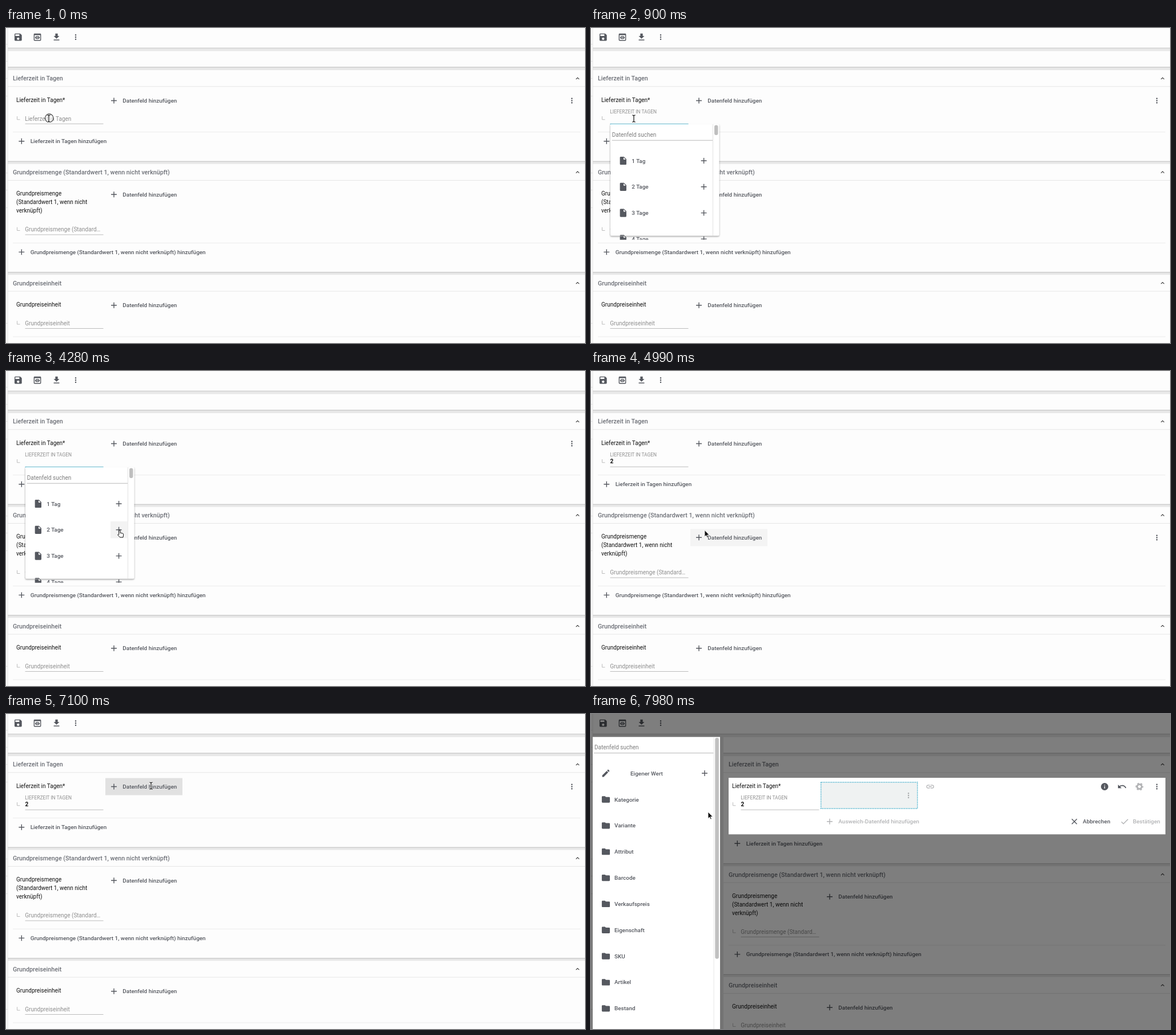
An HTML page for the animation above (8000 ms loop, 1014 by 553 pixels).

```html
<!DOCTYPE html>
<html lang="de">
<head>
<meta charset="utf-8">
<title>Datenfelder</title>
<style>
html, body { margin: 0; width: 100%; height: 100%; overflow: hidden; background: #fdfdfd; }
svg { display: block; width: 100%; height: 100%; }
text { font-family: Roboto, sans-serif; white-space: pre; }
</style>
</head>
<body>
<svg id="stage" viewBox="0 0 1014 553"></svg>
<script>
const LOOP = 8000;
const INK = '#55585f', HEAD = '#6d7077', SOFT = '#8e8e8e', OFF = '#b3b4b6', PAPER = '#fdfdfd';

const ICONS = {
  add: 'M19 13h-6v6h-2v-6H5v-2h6V5h2v6h6v2z',
  save: 'M17 3H5c-1.11 0-2 .9-2 2v14c0 1.1.89 2 2 2h14c1.1 0 2-.9 2-2V7l-4-4zm-5 16c-1.66 0-3-1.34-3-3s1.34-3 3-3 3 1.34 3 3-1.34 3-3 3zm3-10H5V5h10v4z',
  preview: 'M19 3H5c-1.1 0-2 .9-2 2v14c0 1.1.9 2 2 2h14c1.1 0 2-.9 2-2V5c0-1.1-.9-2-2-2zm0 16H5V7h14v12zM12 9c-2.73 0-5.06 1.66-6 4 .94 2.34 3.27 4 6 4s5.06-1.66 6-4c-.94-2.34-3.27-4-6-4zm0 6.5a2.5 2.5 0 0 1 0-5 2.5 2.5 0 0 1 0 5zm0-1a1.5 1.5 0 0 0 0-3 1.5 1.5 0 0 0 0 3z',
  download: 'M19 9h-4V3H9v6H5l7 7 7-7zM5 18v2h14v-2H5z',
  dots: 'M12 8a2 2 0 0 0 0-4 2 2 0 0 0 0 4zm0 6a2 2 0 0 0 0-4 2 2 0 0 0 0 4zm0 6a2 2 0 0 0 0-4 2 2 0 0 0 0 4z',
  up: 'M12 8l-6 6 1.41 1.41L12 10.83l4.59 4.58L18 14z',
  folder: 'M10 4H4c-1.1 0-2 .9-2 2v12c0 1.1.9 2 2 2h16c1.1 0 2-.9 2-2V8c0-1.1-.9-2-2-2h-8l-2-2z',
  file: 'M6 2c-1.1 0-2 .9-2 2v16c0 1.1.9 2 2 2h12c1.1 0 2-.9 2-2V8l-6-6H6zm7 7V3.5L18.5 9H13z',
  pencil: 'M3 17.25V21h3.75L17.81 9.94l-3.75-3.75L3 17.25zM20.71 7.04c.39-.39.39-1.02 0-1.41l-2.34-2.34c-.39-.39-1.02-.39-1.41 0l-1.83 1.83 3.75 3.75 1.83-1.83z',
  info: 'M12 2a10 10 0 0 0 0 20 10 10 0 0 0 0-20zm1 15h-2v-6h2v6zm0-8h-2V7h2v2z',
  undo: 'M12.5 8c-2.65 0-5.05.99-6.9 2.6L2 7v9h9l-3.62-3.62c1.39-1.16 3.16-1.88 5.12-1.88 3.54 0 6.55 2.31 7.6 5.5l2.37-.78C21.08 11.03 17.15 8 12.5 8z',
  link: 'M3.9 12c0-1.71 1.39-3.1 3.1-3.1h4V7H7a5 5 0 0 0 0 10h4v-1.9H7c-1.71 0-3.1-1.39-3.1-3.1zM8 13h8v-2H8v2zm9-6h-4v1.9h4a3.1 3.1 0 0 1 0 6.2h-4V17h4a5 5 0 0 0 0-10z',
  close: 'M19 6.41L17.59 5 12 10.59 6.41 5 5 6.41 10.59 12 5 17.59 6.41 19 12 13.41 17.59 19 19 17.59 13.41 12z',
  check: 'M9 16.17L4.83 12l-1.42 1.41L9 19 21 7l-1.41-1.41z'
};

// Text and icons are placed by their vertical centre.
const text = (x, y, s, { size = 10, weight = 400, fill = '#111', id = '' } = {}) =>
  `<text ${id && `id="${id}"`} x="${x}" y="${y + size * .355}" font-size="${size}" font-weight="${weight}" fill="${fill}">${s}</text>`;
const strong = (x, y, s, fill = INK) => text(x, y, s, { size: 9.95, weight: 500, fill });
const rect = (x, y, w, h, fill, extra = '') =>
  `<rect x="${x}" y="${y}" width="${w}" height="${h}" fill="${fill}" ${extra}/>`;
const icon = (name, x, y, { size = 17, fill = INK, id = '' } = {}) =>
  `<path ${id && `id="${id}"`} d="${ICONS[name]}" fill="${fill}" fill-rule="evenodd" transform="translate(${x - size / 2} ${y - size / 2}) scale(${size / 24})"/>`;
const group = (id, body, extra = '') => `<g id="${id}" ${extra}>${body}</g>`;
const dots = (x, y, opts) => icon('dots', x, y, { size: 15, ...opts });

const DELIVERY = 'Lieferzeit in Tagen', AMOUNT = 'Grundpreismenge (Standardwert 1, wenn nicht verknüpft)', UNIT = 'Grundpreiseinheit';

function field(dx, y, content) {
  return `<path d="M${dx + 19.5} ${y - 4}v5.8h5" fill="none" stroke="#bcbcbc"/>`
    + rect(dx + 33.5, y + 8.7, 137, 1, '#bdbdbd') + content;
}
const labels = (dx, y, lines) => lines.map((s, i) => text(dx + 18, y + i * 15, s)).join('');
const addField = (dx, y) => icon('add', dx + 189, y) + strong(dx + 204.3, y, 'Datenfeld hinzufügen');
const floatLabel = (dx, id) => text(dx + 33.3, 147.3, DELIVERY.toUpperCase(), { size: 8.4, fill: SOFT, id });
const value = dx => text(dx + 33.5, 158.8, '2', { weight: 700 });

function section(dx, top, title, { lines, hint, row = true, grow = 0, hover = '', name }) {
  const extra = grow + (lines.length - 1) * 15;
  const x = dx + 3, bottom = top + 160 + extra;
  let out = rect(x, top, 1014 - x, 160 + extra, PAPER)
    + rect(x, bottom - .4, 1014 - x, 1.2, '#c6c6c6')
    + text(dx + 12, top + 14.5, title, { size: 10.72, weight: 500, fill: HEAD })
    + icon('up', 1001, top + 14.5, { size: 12.5, fill: '#333' })
    + rect(x, top + 28.3, 1014 - x, 1, '#e6e6e6')
    + rect(dx + 12, top + 108.2 + extra, 994 - dx, 1, '#ebebeb')
    + icon('add', dx + 27.3, top + 124.7 + extra)
    + strong(dx + 42.7, top + 124.7 + extra, name + ' hinzufügen');
  if (row) out += hover + labels(dx, top + 52, lines) + addField(dx, top + 53.5)
    + field(dx, top + 85 + extra, hint);
  return out;
}

const hintText = (dx, y, s) => text(dx + 33.3, y, s, { fill: SOFT });

function page(dx, grow) {
  const first = dx === 0;
  const y2 = 238.7 + grow, y3 = 433.3 + grow;
  const live = first ? text(33.3, 159, DELIVERY, { fill: SOFT, id: 'hint' }) + floatLabel(0, 'float')
    + rect(33.5, 168, 137, 1.4, '#5bc2dc', 'id="focus"') + group('value', value(0)) : '';
  return rect(0, 0, 1014, 553, PAPER) + rect(3, 0, 1011, 553, '#e8e8e8')
    + [28, 58, 88, 119, 254, 284, 315, 518].map(y => rect(0, y, 3, 1, '#e6e6e6')).join('')
    + rect(3, 0, 1011, 35, PAPER) + rect(3, 34.6, 1011, 1.2, '#cbcbcb')
    + icon('save', 21.3, 16) + icon('preview', 55, 16) + icon('download', 88.5, 16) + dots(122, 16)
    + rect(dx + 3, 40.5, 1011, 28, PAPER) + rect(dx + 3, 68.2, 1011, 1.2, '#c6c6c6')
    + section(dx, 74, DELIVERY, { lines: [DELIVERY + '*'], hint: live, row: first, grow, name: DELIVERY,
        hover: rect(174, 112.5, 135, 30, '#f4f4f4', 'id="hover1"') })
    + section(dx, y2, AMOUNT, { lines: ['Grundpreismenge', '(Standardwert 1, wenn nicht', 'verknüpft)'], name: AMOUNT,
        hint: hintText(dx, y2 + 115, 'Grundpreismenge (Standard…'),
        hover: first ? rect(174, 277.5, 135, 30, '#f4f4f4', 'id="hover2"') : '' })
    + section(dx, y3, UNIT, { lines: [UNIT], name: UNIT, hint: hintText(dx, y3 + 85, UNIT) })
    + rect(2.6, 0, .8, 553, '#d9d9d9')
    + (first ? dots(991, 127.5, { id: 'dots1' }) + dots(991, 292.5, { id: 'dots2' }) : '');
}

const popup = group('popup',
  rect(34, 168.8, 190.3, 196, '#fff', 'rx="2" filter="url(#shadow)"')
  + text(36.7, 187.5, 'Datenfeld suchen', { fill: '#7d7d7d' })
  + rect(36.7, 196.7, 176.5, 1, '#b8b8b8') + rect(213.2, 169, .8, 195.5, '#dcdcdc')
  + rect(216, 170.5, 6.4, 17.5, '#bfbfbf', 'rx="3"')
  + rect(183, 264, 30.5, 29.5, '#f3f3f3', 'id="itemHover"')
  + ['1 Tag', '2 Tage', '3 Tage', '4 Tage'].map((s, i) => {
      const y = 233 + 45.8 * i;
      return icon('file', 56.3, y) + strong(71.3, y, s) + icon('add', 197.6, y);
    }).join(''), 'clip-path="url(#popupClip)"');

const sidebar = rect(3, 40.3, 223, 513, '#fff')
  + text(6, 58.5, 'Datenfeld suchen', { fill: '#7d7d7d' })
  + rect(5, 68, 209.5, 1, '#b8b8b8') + rect(214.7, 40.3, .8, 513, '#e0e0e0')
  + rect(217.3, 41.7, 6.6, 388, '#c0c0c0', 'rx="3.3"')
  + icon('pencil', 26, 104) + strong(69, 104, 'Eigener Wert') + icon('add', 199, 104)
  + ['Kategorie', 'Variante', 'Attribut', 'Barcode', 'Verkaufspreis', 'Eigenschaft', 'SKU', 'Artikel', 'Bestand']
      .map((s, i) => icon('folder', 26, 150 + 45.85 * i) + strong(41, 150 + 45.85 * i, s)).join('');

const gear = `<g transform="translate(960.5 127.5) scale(.7)" fill="none" stroke="${OFF}">
  <circle r="5.7" stroke-width="4.2"/><circle r="8.4" stroke-width="2.8" stroke-dasharray="4.5 4.296" stroke-dashoffset="2.25"/></g>`;

const editor = rect(241, 112, 765, 99.3, '#fff')
  + labels(229, 126, [DELIVERY + '*']) + field(229, 159, floatLabel(229, 'float2') + value(229))
  + rect(402.7, 119.7, 169, 46.3, '#eff2f2', 'stroke="#35a9c8" stroke-width="1.5" stroke-dasharray="1.5 1.5"')
  + dots(556, 143, { fill: '#a9abad' }) + icon('link', 594, 127.5, { size: 16, fill: OFF })
  + icon('info', 899.5, 127.5, { size: 15.5 }) + icon('undo', 930, 127.5) + gear + dots(991, 127.5)
  + rect(403.3, 174, 180.7, 29.5, '#eeeeee', 'id="hover3"')
  + icon('add', 418, 188.7, { fill: OFF }) + strong(433.3, 188.7, 'Ausweich-Datenfeld hinzufügen', OFF)
  + icon('close', 846.5, 188.7) + strong(861.3, 188.7, 'Abbrechen')
  + icon('check', 934.5, 188.7, { fill: OFF }) + strong(949, 188.7, 'Bestätigen', OFF);

const BEAM = 'M-2.8-6Q0-6 0-4.5V4.5Q0 6-2.8 6M2.8-6Q0-6 0-4.5M0 4.5Q0 6 2.8 6';
const pointer = group('pointer',
  '<circle id="ring" r="7.3" fill="#fff" fill-opacity=".45" stroke="#333" stroke-width="1.1"/>'
  + group('beam', `<path d="${BEAM}" stroke="#fff" stroke-width="2.6"/><path d="${BEAM}" stroke="#111" stroke-width="1.2"/>`, 'fill="none"')
  + group('hand', '<path d="M-1.2 7.6V1a1.2 1.2 0 0 1 2.4 0v3.7l3.9.8q1.8.4 1.6 2.3l-.7 4.7H.6L-3.4 8.2q.5-1.6 2.2-.6z" fill="#fff" stroke="#111" stroke-linejoin="round"/>')
  + group('arrow', '<path d="M0 0v11.6l2.7-2.5 1.8 4 1.8-.8-1.7-3.9h3.7z" fill="#111" stroke="#fff" stroke-width=".8"/>'));

document.getElementById('stage').innerHTML = `<defs>
  <filter id="shadow" x="-10%" y="-10%" width="120%" height="120%"><feDropShadow dx="0" dy="1.2" stdDeviation="1.6" flood-opacity=".4"/></filter>
  <clipPath id="popupClip"><path d="M28 168.5h202v196.3H224.3v0h5.7v7H28v-7z"/></clipPath></defs>`
  + group('plain', page(0, 0) + popup + rect(34, 364.8, 190.3, .8, '#c4c4c4', 'id="popupEdge"'))
  + group('modal', page(229, 28.5) + rect(0, 0, 1014, 553, '#000', 'opacity=".5"') + sidebar + editor)
  + pointer;

const el = Object.fromEntries([...document.querySelectorAll('[id]')].map(e => [e.id, e]));
const show = (id, on) => el[id].setAttribute('display', on ? 'inline' : 'none');
const set = (id, attrs) => Object.entries(attrs).forEach(([k, v]) => el[id].setAttribute(k, v));

// Each move jumps through its path in n evenly timed steps.
const MOVES = [
  { from: 3230, to: 4010, n: 10, path: [[75, 159], [150, 163], [222, 192], [236, 235], [211, 280]] },
  { from: 4100, to: 4280, n: 3, path: [[211, 280], [199, 279.5]] },
  { from: 5880, to: 6570, n: 9, path: [[199.5, 281], [254, 126]] },
  { from: 7540, to: 7980, n: 6, path: [[254, 126], [200, 135], [141, 155], [180, 170], [205, 172]] }
];
const steps = (t, from, to, n) => t < from ? 0 : Math.min(n, 1 + Math.floor((t - from) / (to - from) * (n - 1) + .01));
const smooth = p => p * p * (3 - 2 * p);

function along(path, p) {
  const s = p * (path.length - 1), i = Math.min(path.length - 2, Math.floor(s)), f = s - i;
  return [0, 1].map(k => path[i][k] + (path[i + 1][k] - path[i][k]) * f);
}
function pointerAt(t) {
  const m = MOVES.filter(m => t >= m.from).pop();
  return m ? along(m.path, smooth(steps(t, m.from, m.to, m.n) / m.n)) : MOVES[0].path[0];
}
const within = (t, a, b) => t >= a && t < b;

function draw(t) {
  const [x, y] = pointerAt(t);
  const modal = t >= 7190, open = within(t, 900, 4900), picked = t >= 4900;
  const ring = t < 90 || within(t, 4640, 4730) || within(t, 6930, 7015);
  const overItem = open && y > 264 && x < 214;
  const overFirst = y < 183 || (open && x < 224);

  show('plain', !modal);
  show('modal', modal);
  show('popup', open);
  show('popupEdge', open);
  show('itemHover', overItem);

  const focus = steps(t, 360, 630, 4) / 4, size = 10 - 1.6 * focus;
  show('hint', !focus);
  show('float', focus > 0);
  set('float', { y: 159 - 11.7 * focus + size * .355, 'font-size': size });
  show('focus', focus > 0 && t < 4640);
  set('focus', { x: 102 - 68.5 * focus, width: 137 * focus });
  show('value', picked);

  show('dots1', overFirst);
  show('dots2', picked && y > 268);
  show('hover1', picked && y < 142);
  set('hover1', { fill: t >= 7100 ? '#e1e1e1' : t >= 7015 ? '#ebebeb' : '#f4f4f4' });
  show('hover2', t >= 4990 && y > 273);
  show('hover3', t < 7280);

  const beam = t < 7540 && (picked ? y < 130 : y < 168 && x < 171);
  const hand = overItem;
  show('beam', beam);
  show('hand', hand);
  show('arrow', !beam && !hand);
  show('ring', ring);
  set('ring', { cx: hand ? 1.8 : .7, cy: hand ? 4.8 : -.8 });
  set('pointer', { transform: `translate(${x} ${y})` });
}

const start = performance.now();
function tick(now) {
  draw(Math.max(0, now - start) % LOOP);
  requestAnimationFrame(tick);
}
draw(0);
requestAnimationFrame(tick);
</script>
</body>
</html>
```
